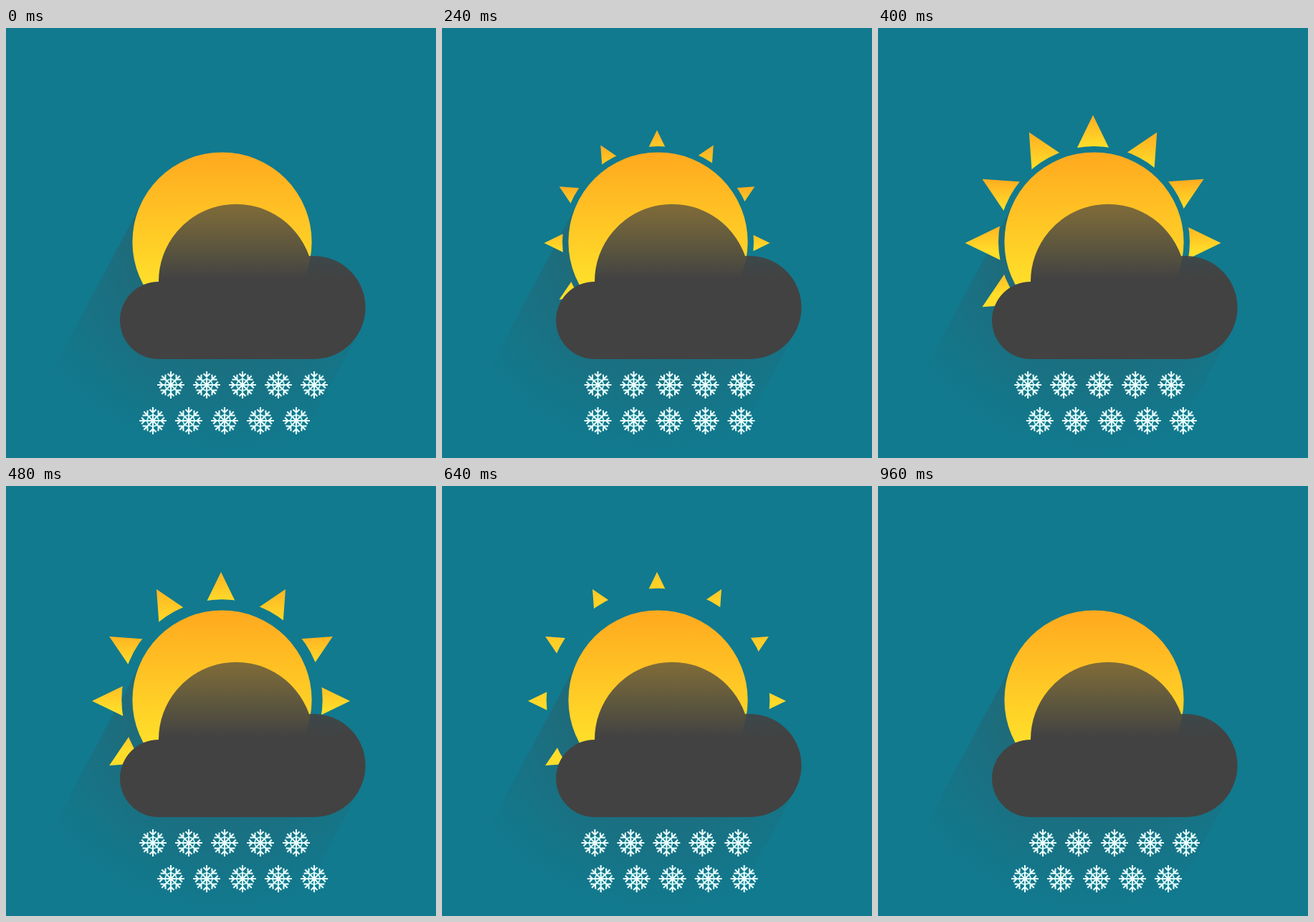
An HTML page that plays this animation: 600 px wide and 600 px high, repeating every 1 s.

```html
<!DOCTYPE html>
<html lang="en">
<head>
<meta charset="utf-8">
<title>Sun, cloud and snow</title>
<style>
  html, body { margin: 0; width: 100%; height: 100%; overflow: hidden; background: #117a8f; }
  svg { display: block; width: 100%; height: 100%; }
</style>
</head>
<body>
<svg viewBox="0 0 600 600">
  <defs>
    <linearGradient id="sunFill" x1="0" y1="0" x2="0" y2="1">
      <stop offset="0" stop-color="#ffa91f"/>
      <stop offset=".75" stop-color="#ffe02a"/>
    </linearGradient>
    <linearGradient id="rayFill" x1="0" y1="0" x2="0" y2="1">
      <stop id="rayTop" offset="0" stop-color="#ffac20"/>
      <stop offset=".7" stop-color="#ffde2a"/>
    </linearGradient>
    <linearGradient id="cloudFill" gradientUnits="userSpaceOnUse" x1="0" y1="246" x2="0" y2="350">
      <stop offset="0" stop-color="#424242" stop-opacity=".67"/>
      <stop offset="1" stop-color="#424242"/>
    </linearGradient>
    <radialGradient id="shadowFill" gradientUnits="userSpaceOnUse" cx="300" cy="300" r="298">
      <stop offset=".4" stop-color="#424242" stop-opacity=".27"/>
      <stop offset="1" stop-color="#424242" stop-opacity="0"/>
    </radialGradient>
    <mask id="outside" maskUnits="userSpaceOnUse" x="0" y="0" width="600" height="600">
      <rect width="600" height="600" fill="#fff"/>
      <circle id="hole" cx="301.5" cy="298.5" r="133.5"/>
    </mask>
    <g id="flake" fill="none">
      <path id="flakeRing" stroke="#b4f6f4" stroke-width="1.8"/>
      <path id="flakeArms" stroke="#e9fffe" stroke-width="2.1"/>
    </g>
  </defs>
  <rect width="600" height="600" fill="#117a8f"/>
  <path d="M191.5 240L0 599H400L493 424L300 300Z" fill="url(#shadowFill)"/>
  <g mask="url(#outside)"><g id="rays" fill="url(#rayFill)"></g></g>
  <circle cx="301.5" cy="298.5" r="125.1" fill="url(#sunFill)"/>
  <path d="M213 354A108 108 0 0 1 423 318.3A72 72 0 1 1 429.5 462H213A54 54 0 0 1 213 354Z" fill="url(#cloudFill)"/>
  <g id="upper"></g>
  <g id="lower"></g>
</svg>
<script>
const $ = id => document.getElementById(id);
const LOOP = 1000, STEP = 40, STEPS = 24;
const TURN = 3 / 7; // rays are fully out here, then the hole eats them

const polar = (r, deg) => {
  const a = deg * Math.PI / 180;
  return [(r * Math.sin(a)).toFixed(2), (-r * Math.cos(a)).toFixed(2)].join(' ');
};
const mix = (a, b, k) => Math.round(a + (b - a) * k);

function buildRays() {
  let out = '';
  for (let deg = -120; deg <= 90; deg += 30) {
    out += `<path d="M${polar(180, deg)}L${polar(120, deg + 15)}L${polar(120, deg - 15)}Z"/>`;
  }
  $('rays').innerHTML = out;
}

function buildFlake() {
  let arms = '', ring = 'M';
  // a stem with one pair of twigs
  const arm = (deg, length, root, tip, spread) => {
    arms += `M0 0L${polar(length, deg)}` +
      `M${polar(tip, deg - spread)}L${polar(root, deg)}L${polar(tip, deg + spread)}`;
  };
  for (let deg = 0; deg < 360; deg += 90) {
    arm(deg, 19, 11.5, 16.5, 16);
    arm(deg + 45, 18, 11, 16.2, 18);
    ring += `${polar(8.4, deg)}L${polar(8.4, deg + 45)}${deg < 270 ? 'L' : 'Z'}`;
  }
  $('flakeArms').setAttribute('d', arms);
  $('flakeRing').setAttribute('d', ring);
}

function buildRow(id, x, y) {
  for (let i = 0; i < 5; i++) {
    $(id).innerHTML += `<use href="#flake" x="${x + 50 * i}" y="${y}"/>`;
  }
}

function draw(ms) {
  const p = Math.floor((ms % LOOP) / STEP) / STEPS;
  const scale = Math.min(1, 0.7 + 0.3 * p / TURN);
  const eaten = Math.max(0, (p - TURN) / (1 - TURN));
  const warm = Math.min(1, eaten * 2.4);
  const sway = 25 * (1 - Math.abs(1 - 2 * p));

  $('rays').setAttribute('transform', `translate(300 300) scale(${scale})`);
  $('hole').setAttribute('r', 133.5 + 53.5 * eaten);
  $('rayTop').setAttribute('stop-color', `rgb(255,${mix(172, 200, warm)},${mix(32, 38, warm)})`);
  $('upper').setAttribute('transform', `translate(${-sway} 0)`);
  $('lower').setAttribute('transform', `translate(${sway} 0)`);
}

buildRays();
buildFlake();
buildRow('upper', 230, 498);
buildRow('lower', 205, 548);

const start = performance.now();
function tick() {
  draw(performance.now() - start);
  requestAnimationFrame(tick);
}
draw(0);
requestAnimationFrame(tick);
</script>
</body>
</html>
```
